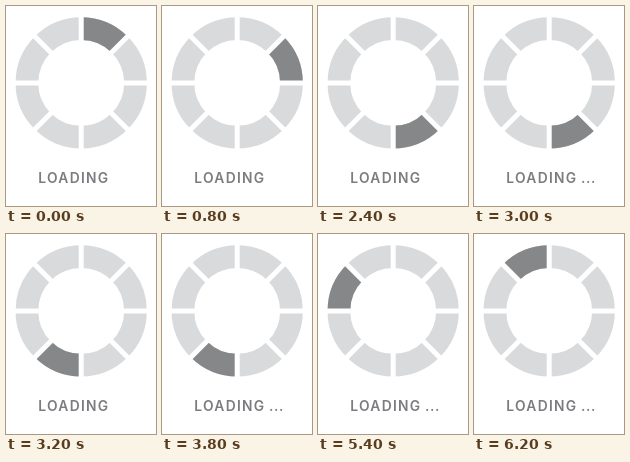
An HTML page that plays this animation: 150 by 200 pixels, repeating every 6400 ms.

```html
<!DOCTYPE html>
<html lang="en">
<head>
<meta charset="utf-8">
<title>Loading</title>
<style>
  html, body { margin: 0; width: 100%; height: 100%; overflow: hidden; background: #fff; }
  svg { display: block; width: 150px; height: 200px; }
  text { font: 600 13.8px Inter, sans-serif; letter-spacing: 1.3px; fill: #7b7c7f; }
</style>
</head>
<body>
<svg viewBox="0 0 150 200">
  <g transform="translate(75.2 76.9)" fill="none">
    <g stroke-width="22.7">
      <circle r="54.3" stroke="#d9dadc"/>
      <path id="active" d="M0 -54.3A54.3 54.3 0 0 1 38.4 -38.4" stroke="#868789"/>
    </g>
    <g id="gaps" stroke="#fff" stroke-width="5"></g>
  </g>
  <text x="32.3" y="177">LOADING</text>
  <text id="dots" x="107 112 117" y="177"></text>
</svg>
<script>
  const STEP = 200, DOT_STEPS = 4, SEGMENTS = 8;
  const get = id => document.getElementById(id);
  const active = get('active'), dots = get('dots');

  get('gaps').innerHTML = [0, 45, 90, 135]
    .map(a => `<path d="M0 -68V68" transform="rotate(${a})"/>`).join('');

  function draw(now) {
    const step = Math.floor(now / STEP);
    const segment = Math.floor(step / DOT_STEPS) % SEGMENTS;
    active.setAttribute('transform', `rotate(${segment * 360 / SEGMENTS})`);
    dots.textContent = '.'.repeat(step % DOT_STEPS);
  }

  const start = performance.now();
  function tick() {
    draw(performance.now() - start);
    requestAnimationFrame(tick);
  }
  tick();
</script>
</body>
</html>
```
